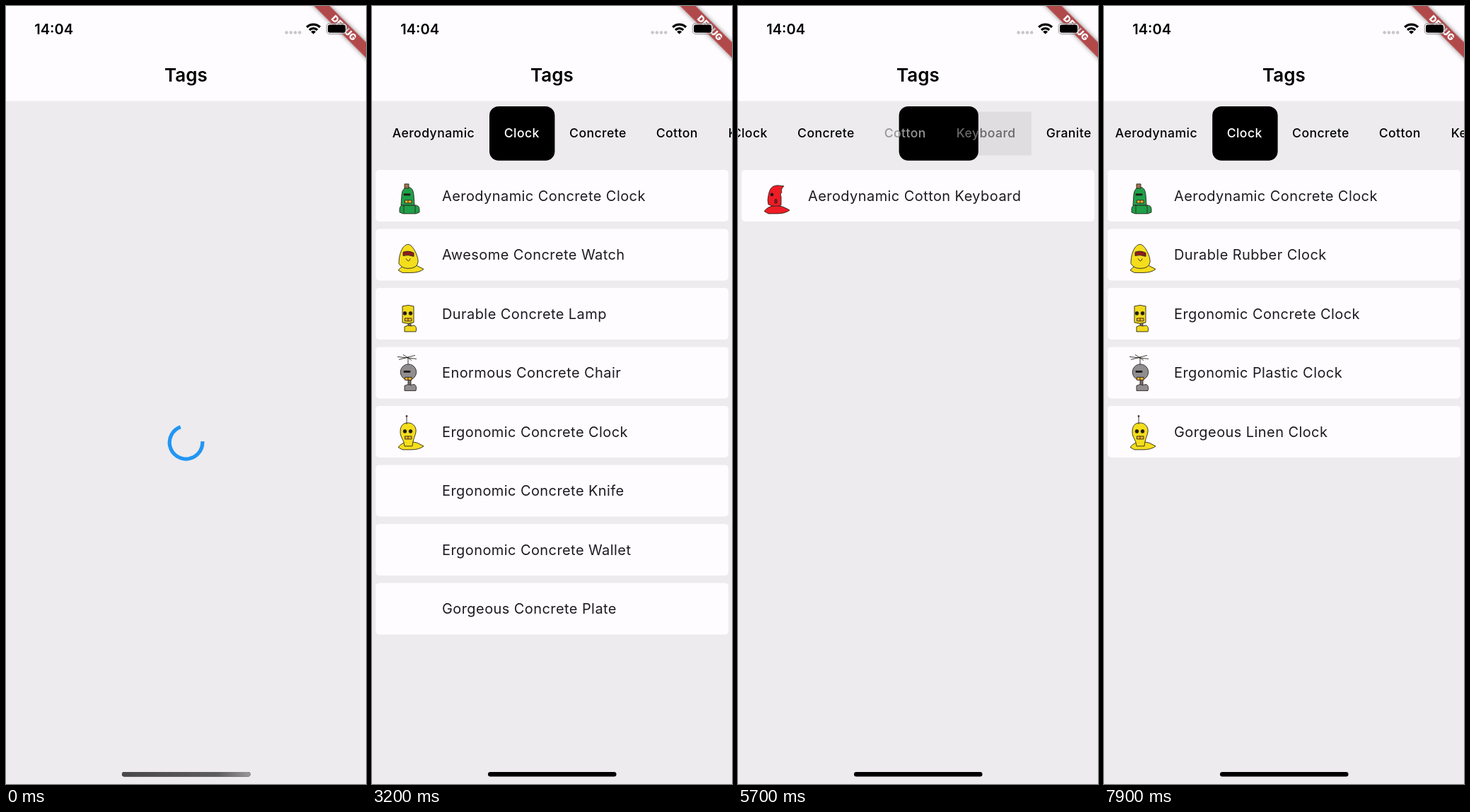
Animation, 509 px wide and 1101 px high, one loop 8000 ms. Source, as an HTML page:

```html
<!DOCTYPE html>
<html lang="en">
<head>
<meta charset="utf-8">
<title>Tags</title>
<style>
  html, body { margin: 0; width: 100%; height: 100%; overflow: hidden; background: #edebee; }
  svg { display: block; width: 509px; height: 1101px; font-family: Inter, "Noto Sans", sans-serif; }
  .clock { font-size: 20px; font-weight: 600; }
  .title { font-size: 26px; font-weight: 600; text-anchor: middle; }
  .debug { font-size: 12.8px; font-weight: 900; fill: #fff; text-anchor: middle; }
  .tab { font-size: 17.6px; font-weight: 500; letter-spacing: .43px; }
  .row { font-size: 20px; letter-spacing: .42px; fill: #1d1b20; }
  .bot { stroke: #2a2420; stroke-width: .9; stroke-linejoin: round; }
</style>
</head>
<body>
<svg viewBox="0 0 509 1101">
  <defs>
    <linearGradient id="fade">
      <stop offset="0" stop-color="#48474a"/>
      <stop offset=".75" stop-color="#5d5c5f"/>
      <stop offset="1" stop-color="#99979a"/>
    </linearGradient>
    <filter id="shade" x="-20%" y="-80%" width="140%" height="260%">
      <feDropShadow dx="0" dy="0" stdDeviation="3.4" flood-opacity=".5"/>
    </filter>
  </defs>
  <rect width="509" height="1101" fill="#edebee"/>
  <path id="spinner" fill="none" stroke="#2196f3" stroke-width="5.2"/>
  <g id="list"></g>
  <g id="tabs">
    <rect id="ripple" y="149.5" height="62"/>
    <rect id="pill" y="142" height="76.7" rx="13"/>
    <g id="labels"></g>
  </g>
  <rect width="509" height="134.5" fill="#fefcff"/>
  <text class="title" x="254.4" y="106.7">Tags</text>
  <g transform="translate(509 0) rotate(45)">
    <rect x="-62" y="36.3" width="124" height="15.5" fill="#b14a4b" filter="url(#shade)"/>
    <text class="debug" x="0" y="48.6">DEBUG</text>
  </g>
  <text class="clock" x="40.3" y="39.8">14:04</text>
  <g fill="#c9c7ca">
    <circle cx="396.6" cy="37.6" r="2.3"/><circle cx="402.8" cy="37.6" r="2.3"/>
    <circle cx="409" cy="37.6" r="2.3"/><circle cx="415.2" cy="37.6" r="2.3"/>
  </g>
  <g fill="none" stroke="#000" stroke-width="3.2">
    <path d="M425.2 30a13.300 13.300 0 0 1 18.800 0M429 34a8 8 0 0 1 11.2 0"/>
    <path d="M434.6 39.8l-3.4-3.4a4.8 4.8 0 0 1 6.8 0z" fill="#000" stroke="none"/>
  </g>
  <rect x="453.2" y="24.6" width="28.6" height="15" rx="4.4" fill="#fefcff" fill-opacity=".55" stroke="#777" stroke-opacity=".7" stroke-width="1.1"/>
  <rect x="455" y="26.4" width="25" height="11.4" rx="2.8"/>
  <path d="M483.2 29.6q2.4 2.5 0 5z" fill="#777"/>
  <rect id="home" x="164" y="1084" width="181.5" height="6.5" rx="3.2"/>
  <rect id="homeFade" x="164" y="1084" width="181.5" height="6.5" rx="3.2" fill="url(#fade)"/>
</svg>
<script>
const LOOP = 8000, STEP = 100, MOVE = 300;
const el = id => document.getElementById(id);
const lerp = (a, b, k) => a + (b - a) * k;
const clamp = x => Math.min(1, Math.max(0, x));

function bezier(x1, y1, x2, y2) {
  const at = (a, b, s) => 3 * a * s * (1 - s) ** 2 + 3 * b * s * s * (1 - s) + s ** 3;
  return x => {
    if (x <= 0 || x >= 1) return clamp(x);
    let lo = 0, hi = 1;
    for (let i = 0; i < 24; i++) {
      const mid = (lo + hi) / 2;
      if (at(x1, x2, mid) < x) lo = mid; else hi = mid;
    }
    return at(y1, y2, lo);
  };
}
const ease = bezier(.25, .1, .25, 1);
const swift = bezier(.4, 0, .2, 1);

// Small robots, built from shared parts
const part = (d, fill) => `<path d="${d}" fill="${fill}"/>`;
const dot = (x, y, r, fill) => `<circle cx="${x}" cy="${y}" r="${r}" fill="${fill}"/>`;
const heads = {
  dome: 'M41 50L42 35Q43 25 50.5 24.5T59 35L60 50Z',
  horn: 'M43 49Q41 43 43 36C45 25 49 22 57 22L65 23Q60 27 62 32Q59 33 61 38V50Q51 53 43 49Z',
  ball: 'M51.5 24.500a11.200 11.200 0 1 1-.1 0Z',
  orb: 'M49 26C56 26 59 32 58 39Q56 46 49 47Q42 46 40 39C39 32 42 26 49 26Z',
  can: 'M43 26Q51 23 59 26V49Q51 52 43 49Z',
  onion: 'M50 23C54 30 64 33 64 42S58 54 51 54 38 50 38 42 46 30 50 23Z',
  hood: 'M38 49C38 34 44 22 51 22S66 40 65 47Q64 56 51 56Q42 56 38 49Z',
  cone: 'M38 33Q38 28 44 27Q51 23 59 27Q66 29 64 35Q62 46 55 50H47Q39 44 38 33Z',
  oval: 'M51 24C59 24 63 31 62 37S58 47 57 57H46C45 47 40 45 40 37S43 24 51 24Z',
  jar: 'M42 50L41 30Q42 25 51 24T59 31L60 50Z'
};
const bodies = {
  broad: 'M39 60V55Q40 49 45 50H61Q67 50 67 56V60L62 62H44ZM45 50V61M61 50V61',
  wing: 'M32 52.500Q37 57 43 56Q53 49 63 56Q69 56 74 52.500Q69 60 62 62H44Q37 60 32 52.500Z',
  bust: 'M37 58.500Q44 50 55 50.500Q64 51 73 57Q67 62 55 62H43Z',
  base: 'M46 55Q51 52 55 54L60 53Q64 56 62 62H46Z',
  disc: 'M38 60Q43 52 53 52T69 60L64 62H43Z'
};
const neck = part('M51 46H55V55H51Z', '#77716c');
const tops = {
  none: '',
  cap: part('M46 20H52V26H46Z', '#a0764a'),
  grid: part('M36 14L63 17M38 18L61 12M44 11L56 19M51 14V25', 'none'),
  hair: part('M50 26L43 18M50 26L46 16M50 26V15M50 26L54 16M50 26L57 19', 'none'),
  wire: part('M49 26V15', 'none') + dot(49, 14.5, 1, '#e0202a')
};
const eyes = fill => dot(46.5, 36, 2.4, fill) + dot(54.5, 36, 2.4, fill);
const mouth = part('M46.500 43H56V47H46.500ZM51 43V47', '#f3b327');
const faces = {
  slit: part('M45 34H54V36H45Z', '#111') + mouth,
  peek: dot(48, 35, 2, '#111') + part('M52 42H55V47H52Z', '#a01018'),
  visor: part('M44 33Q51 30 59 34V39Q51 36 44 38Z', '#8c1d1d') + part('M48 42Q52 49 54 42', 'none'),
  band: part('M41 34H57V38H41Z', '#c8584c') + part('M45 41H53V43H45Z', '#ddd'),
  glass: part('M43 32Q51 28 59 33L57 38Q50 34 44 36Z', '#59c2ee'),
  bolt: part('M45 33H56V36H45Z', '#0a3b60') + part('M50 41H53V47H50Z', '#0d5585'),
  dark: eyes('#221b16') + mouth,
  dim: eyes('#3c2416') + part('M48 43H55V46H48Z', '#4a2f20'),
  lamp: eyes('#f0b429') + part('M46 44H55', 'none')
};
const bots = {
  green: ['#1f9f49', 'cap', 'dome', 'broad', 'slit'],
  red: ['#ee1c25', 'none', 'horn', 'bust', 'peek'],
  silver: ['#a3a1a3', 'cap', 'orb', 'disc', 'band'],
  blue: ['#279fe2', 'grid', 'can', 'broad', 'bolt'],
  onion: ['#6a3f23', 'hair', 'onion', 'wing', 'dark'],
  hood: ['#f4de1c', 'none', 'hood', 'bust', 'visor'],
  can: ['#f0d91b', 'none', 'can', 'base', 'dark'],
  gray: ['#8f8d8f', 'grid', 'ball', 'base', 'slit'],
  oval: ['#f4de1c', 'wire', 'oval', 'bust', 'dark'],
  cone: ['#7a4e35', 'wire', 'cone', 'wing', 'dim'],
  orange: ['#ef8420', 'none', 'ball', 'base', 'glass'],
  jar: ['#f1df20', 'none', 'jar', 'base', 'visor'],
  brown: ['#74492c', 'none', 'dome', 'broad', 'lamp'],
  tuft: ['#7a4e35', 'hair', 'cone', 'base', 'lamp']
};
function bot(name) {
  if (!bots[name]) return '';
  const [color, top, head, body, face] = bots[name];
  return `<g class="bot">${neck}${part(bodies[body], color)}${part(heads[head], color)}${tops[top]}${faces[face]}</g>`;
}

const lists = {
  aero: ['Concrete Clock', 'Cotton Keyboard', 'Granite Bench', 'Linen Bottle', 'Plastic Lamp', 'Rubber Shoes'].map(s => 'Aerodynamic ' + s),
  clock: ['Aerodynamic Concrete', 'Durable Rubber', 'Ergonomic Concrete', 'Ergonomic Plastic', 'Gorgeous Linen'].map(s => s + ' Clock'),
  concrete: ['Aerodynamic Concrete Clock', 'Awesome Concrete Watch', 'Durable Concrete Lamp', 'Enormous Concrete Chair',
    'Ergonomic Concrete Clock', 'Ergonomic Concrete Knife', 'Ergonomic Concrete Wallet', 'Gorgeous Concrete Plate'],
  cotton: ['Aerodynamic Cotton Keyboard', 'Awesome Cotton Computer', 'Awesome Cotton Computer', 'Awesome Cotton Table',
    'Enormous Cotton Hat', 'Ergonomic Cotton Computer', 'Gorgeous Cotton Gloves'],
  keyboard: ['Aerodynamic Cotton Keyboard']
};
const aeroBots = 'green red silver blue onion orange';
const clockBots = 'green hood can gray oval';
const concreteBots = 'green orange tuft blue can brown jar gray';
const cottonBots = 'red cone cone orange jar brown tuft';

// start time, rows, avatars loaded so far
const scenes = [
  [0, null, ''],
  [500, 'aero', ''],
  [1000, 'aero', 'green red - blue - orange'],
  [1300, 'aero', 'green red silver blue - orange'],
  [1400, 'aero', aeroBots],
  [2400, 'clock', aeroBots],
  [2800, 'clock', clockBots],
  [3200, 'concrete', clockBots],
  [3700, 'concrete', concreteBots],
  [4000, 'cotton', concreteBots],
  [4300, 'cotton', cottonBots],
  [5700, 'keyboard', cottonBots],
  [6900, 'cotton', cottonBots],
  [7800, 'clock', clockBots]
];
// start time, tab from, tab to, progress already made, scroll lag
const moves = [
  [2400, 0, 1, .332, .11],
  [3200, 1, 2, 0, 0],
  [4000, 2, 3, 0, .1],
  [5700, 3, 4, .25, .083],
  [6900, 4, 3, .332, .11],
  [7800, 3, 1, .62, .29]
];

const names = ['Aerodynamic', 'Clock', 'Concrete', 'Cotton', 'Keyboard', 'Granite', 'Plastic'];
const edges = [8, 166, 258.4, 381, 483, 610, 716.5, 820];
const scrollTo = i => Math.max(0, (edges[i] + edges[i + 1]) / 2 - 262.3);
el('labels').innerHTML = names.map((s, i) => `<text class="tab" x="${edges[i] + 20.7}" y="185.5">${s}</text>`).join('');
const labels = [...el('labels').children];

function box(node, x, w) {
  node.setAttribute('x', x);
  node.setAttribute('width', w);
}

function drawList(scene) {
  const [, key, avatars] = scene;
  const icons = avatars.split(' ');
  el('list').innerHTML = (lists[key] || []).map((s, i) =>
    `<g transform="translate(0 ${231.9 + i * 83.5})"><rect x="5.2" width="498.7" height="73" rx="5" fill="#fefcff"/>` +
    `${bot(icons[i])}<text class="row" x="99" y="44">${s}</text></g>`).join('');
}

function drawTabs(t) {
  const move = moves.filter(m => m[0] <= t).pop() || [-MOVE, 0, 0, 1, 0];
  const [start, from, to, done, lag] = move;
  const x = (t - start) / MOVE + done;
  const k = ease(x);
  const scroll = lerp(scrollTo(from), scrollTo(to), ease(x - lag));
  el('tabs').setAttribute('transform', `translate(${-scroll} 0)`);
  const left = lerp(edges[from], edges[to], k);
  box(el('pill'), left, lerp(edges[from + 1], edges[to + 1], k) - left);
  box(el('ripple'), edges[to], edges[to + 1] - edges[to]);
  el('ripple').setAttribute('opacity', x > 0 ? .08 * clamp(1 - x) : 0);
  labels.forEach((label, i) => {
    const v = Math.round(255 * (i === to ? k : i === from ? 1 - k : 0));
    label.setAttribute('fill', `rgb(${v},${v},${v})`);
  });
}

function drawSpinner(t) {
  const u = .355 + t / 1333;
  const head = swift(clamp(u * 2)), tail = swift(clamp(u * 2 - 1));
  const a = -4 + 270 * tail + 360 * t / 2222 + 90 * t / 1333;
  const b = a + 270 * (head - tail);
  const at = deg => {
    const r = deg * Math.PI / 180;
    return `${254.5 + 23.3 * Math.cos(r)} ${617.7 + 23.3 * Math.sin(r)}`;
  };
  el('spinner').setAttribute('d', `M${at(a)}A23.3 23.3 0 ${b - a > 180 ? 1 : 0} 1 ${at(b)}`);
}

let shown = null;
function draw(now) {
  const t = Math.floor(now % LOOP / STEP) * STEP;
  const scene = scenes.filter(s => s[0] <= t).pop();
  if (scene !== shown) drawList(shown = scene);
  const loading = !scene[1];
  el('spinner').style.display = loading ? '' : 'none';
  el('tabs').style.display = loading ? 'none' : '';
  if (loading) drawSpinner(t); else drawTabs(t);
  el('homeFade').setAttribute('opacity', clamp(1 - t / 600));
}

const begin = performance.now();
function tick() {
  draw(performance.now() - begin);
  requestAnimationFrame(tick);
}
tick();
</script>
</body>
</html>
```
